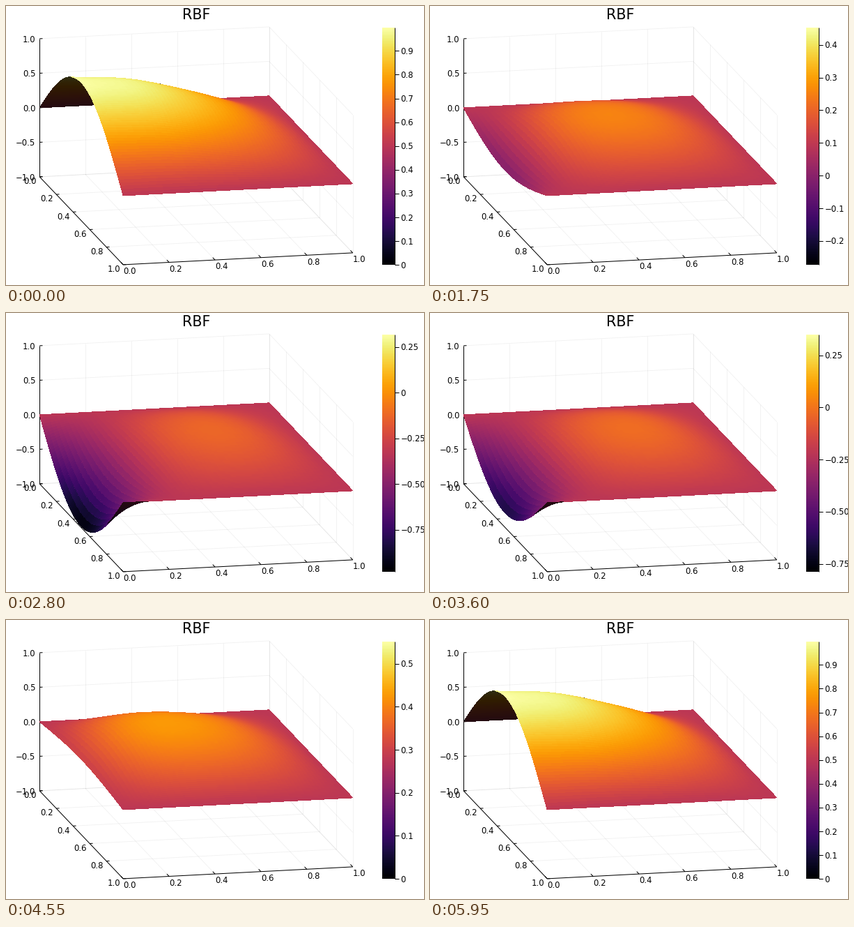
A matplotlib script that plays this animation: 600 px wide and 400 px high, repeating every 6 s.

```python
import numpy as np
import matplotlib.pyplot as plt
from matplotlib.animation import FuncAnimation
from matplotlib.collections import LineCollection, PolyCollection

W, H, DPI = 600, 400, 100
FRAMES, INTERVAL = 120, 50
NX, NY = 56, 96
CMAP = plt.get_cmap("inferno")
BAR = (540, 558, 371, 31)  # left, right, bottom, top
SMALL, LARGE = 11.6, 20.7  # text sizes in pixels

plt.rcParams["font.family"] = "DejaVu Sans"
fig = plt.figure(figsize=(W / DPI, H / DPI), dpi=DPI, facecolor="white")
ax = fig.add_axes([0, 0, 1, 1])
ax.axis("off")


def px(n):
    return n * 72 / DPI


def project(x, y, z):
    """Orthographic view of the unit square, z from -1 to 1."""
    return np.stack([48.2 + 329.5 * x + 120 * y,
                     145.9 - 17 * x + 126 * y - 99 * z], axis=-1)


def label(x, y, text, ha="center", size=SMALL):
    return ax.text(x, y + 0.4 * size, text, ha=ha, va="baseline",
                   fontsize=px(size), color="black", zorder=6)


def lines(segments, width=1.0, zorder=4, **style):
    coll = LineCollection(segments, linewidths=px(width), zorder=zorder, **style)
    ax.add_collection(coll)
    return coll


def number(v, digits):
    if abs(v) < 1e-9:
        return "0"
    return f"{v:.{digits}f}".replace("-", "\u2212")


def draw_box():
    def seg(a, b):
        return [project(*map(float, a)), project(*map(float, b))]

    fifths = np.linspace(0, 1, 6)
    grid = []
    for v in fifths:
        grid += [seg((v, 0, -1), (v, 1, -1)), seg((v, 0, -1), (v, 0, 1)),
                 seg((0, v, -1), (1, v, -1)), seg((1, v, -1), (1, v, 1))]
    for z in np.linspace(-1, 1, 5):
        grid += [seg((0, 0, z), (1, 0, z)), seg((1, 0, z), (1, 1, z))]
    lines(grid, 0.9, 1, colors="black", alpha=0.055)

    axes = [seg((0, 0, -1), (0, 0, 1)), seg((0, 0, -1), (0, 1, -1)),
            seg((0, 1, -1), (1, 1, -1))]
    for z in np.linspace(-1, 1, 5):
        axes.append(seg((0, 0, z), (0.013, 0, z)))
        label(42.5, 146.2 - 99 * z, f"{z:.1f}".replace("-", "\u2212"), "right")
    for k, v in enumerate(fifths):
        axes += [seg((0, v, -1), (0.013, v, -1)),
                 seg((v, 1, -1), (v, 0.973, -1))]
        label(34.8 + 24 * k, 250.3 + 25.3 * k, f"{v:.1f}")
        label(177.8 + 65.8 * k, 379.5 - 3.4 * k, f"{v:.1f}")
    lines(axes, 1.0, 2, colors="black")


def draw_bar():
    left, right, bottom, top = BAR
    ramp = np.linspace(0, 1, 256)[:, None]
    ax.imshow(ramp, cmap=CMAP, origin="lower", aspect="auto", zorder=3,
              extent=(left, right, bottom, top))
    lines([[(right, top), (right, bottom)]], colors="black")


draw_box()
draw_bar()
label(273, 10.4, "RBF", size=LARGE)
ax.set_xlim(0, W)
ax.set_ylim(H, 0)

# Far cells come first: x runs right to left, y back to front.
xs, ys = np.linspace(1, 0, NX + 1), np.linspace(0, 1, NY + 1)
X, Y = np.meshgrid(xs, ys)
source = sum(c * np.sin(n * np.pi * xs)
             for n, c in enumerate((0.53, 0.078, 0.026, 0.01), 1))
decay = np.sinh(np.pi * (1 - xs)) / np.sinh(np.pi)

surface = PolyCollection([], antialiaseds=False, linewidths=0,
                         edgecolors="none", zorder=3)
ax.add_collection(surface)
bar_ticks = lines([], colors="black")
bar_labels = []


def corners(a, span=1):
    """Four corners of each cell, reaching span steps towards the viewer."""
    i, j = np.arange(NY)[:, None], np.arange(NX)[None, :]
    i2, j2 = np.minimum(i + span, NY), np.minimum(j + span, NX)
    quad = np.stack([a[i, j2], a[i, j], a[i2, j], a[i2, j2]], axis=2)
    return quad.reshape((NX * NY, 4) + a.shape[2:])


def update_surface(profile):
    Z = np.sin(np.pi * Y) * profile
    points = project(X, Y, Z)
    quads = corners(points)
    d1, d2 = quads[:, 2] - quads[:, 0], quads[:, 3] - quads[:, 1]
    back = d1[:, 0] * d2[:, 1] - d1[:, 1] * d2[:, 0] < 0
    colors = CMAP((corners(Z).mean(axis=1) + 1) / 2)
    colors[back, :3] *= 0.19
    # Nearer cells cover the overlap, so no gaps show.
    surface.set_verts(corners(points, 2))
    surface.set_facecolor(colors)


def update_bar(lo, hi):
    _, right, bottom, top = BAR
    for step, digits in ((0.1, 1), (0.25, 2)):
        values = step * np.arange(np.ceil(lo / step), np.floor(hi / step) + 1)
        if len(values) <= 10:
            break
    rows = bottom + (values - lo) / (hi - lo) * (top - bottom)
    bar_ticks.set_segments([[(right, r), (right + 6, r)] for r in rows])
    while bar_labels:
        bar_labels.pop().remove()
    for v, r in zip(values, rows):
        bar_labels.append(label(566.3, r, number(v, digits), "left"))


def update(i):
    profile = source + np.cos(2 * np.pi * i / (FRAMES - 1)) * decay
    update_surface(profile)
    update_bar(0.998 * min(profile.min(), 0), 0.998 * profile.max())
    return []


anim = FuncAnimation(fig, update, frames=FRAMES, interval=INTERVAL,
                     init_func=lambda: update(0), repeat=True,
                     repeat_delay=0, blit=False)
plt.show()
```
